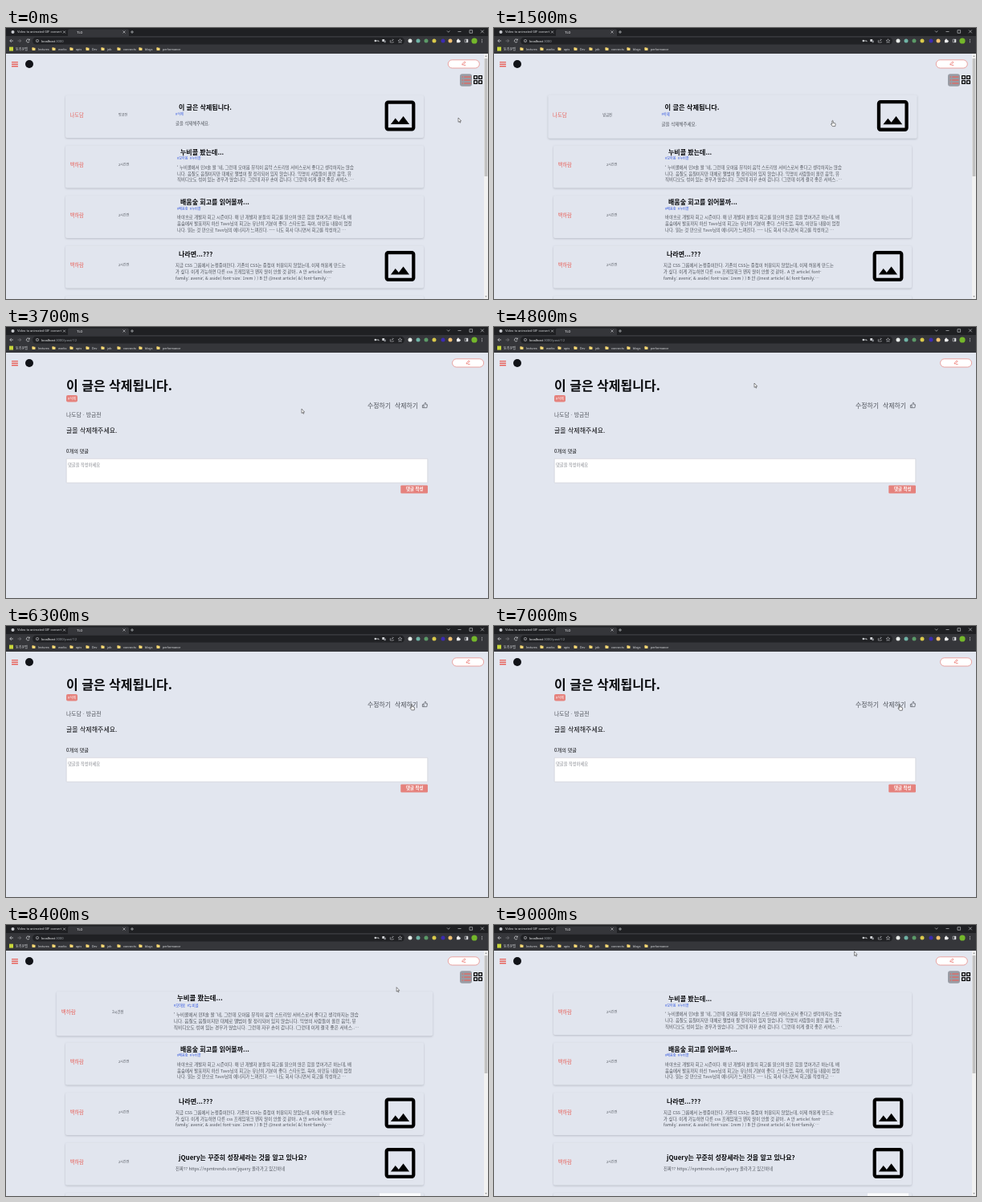
These frames come from a looping animation (600 by 338 pixels, 9100 ms). An HTML page:

```html
<!DOCTYPE html>
<html lang="ko">
<head>
<meta charset="utf-8">
<title>Blog list</title>
<style>
html, body { margin: 0; width: 100%; height: 100%; overflow: hidden; background: #e2e6ef; }
svg { display: block; width: 600px; height: 338px; }
text { font-family: "Noto Sans CJK KR", "Noto Sans CJK", "Noto Sans", sans-serif; white-space: pre; }
.ui text { font-family: Roboto, "Noto Sans CJK KR", "Noto Sans CJK", sans-serif; }
.card > rect:first-child { filter: drop-shadow(0 1px 1px rgba(40, 45, 60, .22)); }
</style>
</head>
<body>
<svg id="stage" viewBox="0 0 600 338" xmlns="http://www.w3.org/2000/svg"></svg>
<script>
const LOOP = 9100, STEP = 100;
const RED = '#e8635c', PINK = '#e5827d', INK = '#08090c', GREY = '#4f535b', BLUE = '#2f55e0';

// y is the vertical middle of the line
const text = (x, y, size, str, fill = INK, weight = 400, extra = '') =>
  `<text x="${x}" y="${(y + size * .36).toFixed(2)}" font-size="${size}" fill="${fill}" font-weight="${weight}" ${extra}>${str.replace(/&/g, '&amp;')}</text>`;
const rect = (x, y, w, h, fill, r = 0, extra = '') =>
  `<rect x="${x}" y="${y}" width="${w}" height="${h}" rx="${r}" fill="${fill}" ${extra}/>`;
const dot = (x, y, r, fill) => `<circle cx="${x}" cy="${y}" r="${r}" fill="${fill}"/>`;
const line = (d, stroke, w = .7, extra = '') =>
  `<path d="${d}" fill="none" stroke="${stroke}" stroke-width="${w}" ${extra}/>`;

// Browser frame
const folders = [[34, 'lectures'], [59, 'works'], [81, 'apis'], [101, 'Dev'], [120, 'job'],
  [140, 'connects'], [167, 'blogs'], [189, 'performance']];
const extensions = [[503, '#e8ece9'], [513, '#6fb3a5'], [523, '#5b9a68'], [533, '#d9c94a'],
  [544, '#3b2bb0'], [553, '#f3c272']];

function browser() {
  const pale = '#d5d7da';
  return `<g class="ui">` +
    rect(0, 0, 600, 11, '#1f2023') + rect(77, 1.5, 76, 10, '#35363a', 2) +
    rect(0, 10, 600, 22, '#35363a') +
    dot(8.5, 5, 2, '#c9cbd0') +
    text(14, 5, 4.1, 'Video to animated GIF convert', pale) +
    line('M71 3.5l3 3m0-3l-3 3M145.5 3.5l3 3m0-3l-3 3M155 5h4m-2-2v4', pale, .6) +
    text(88, 5, 4.2, 'TLO', '#eceef0') +
    line('M549 3.5l1.7 1.8 1.7-1.8M562.5 4.5h4M577 2.7h3.6v3.6h-3.6zM591 2.5l3.8 3.8m0-3.8l-3.8 3.8', pale, .6) +
    line('M9 16H4.8m2-2l-2 2 2 2', pale) + line('M14.5 16h4.2m-2-2l2 2-2 2', '#7b7d82') +
    line('M29 14.8a2 2 0 1 0 .2 2M29.3 13.6v1.6h-1.6', pale) +
    rect(33, 11.7, 463, 8.8, '#202124', 4.4) +
    `<circle cx="39" cy="16" r="1.7" fill="none" stroke="${pale}" stroke-width=".5"/>` +
    line('M39 15.7v1.3M39 14.8v.4', pale, .5) +
    text(44, 16, 4.2, 'localhost<tspan fill="#9aa0a6">:3000<tspan id="path"></tspan></tspan>', '#f1f3f4') +
    dot(459.8, 16, 1.2, pale) + line('M461 16h3v1.2', pale, .8) +
    rect(468.3, 14, 2.8, 3, pale, .4) + rect(470.4, 15.4, 2.4, 2.8, '#85888d', .4) +
    line('M479 15.5h-.7v2.5h4v-1M480 16.5q.3-1.8 2.2-1.8m-1-1l1 1-1 1', pale, .5) +
    line('M490.5 13.7l.7 1.6 1.7.2-1.3 1.2.4 1.7-1.5-.9-1.5.9.4-1.7-1.3-1.2 1.7-.2z', pale, .5) +
    extensions.map(([x, c]) => dot(x, 16, 2.5, c)).join('') +
    rect(561, 14.7, 3.8, 3.6, '#f0f1f2', .4) + dot(562.9, 14.5, .9, '#f0f1f2') + dot(565, 16.5, .9, '#f0f1f2') +
    line('M571.2 14.2h3.8v3.6h-3.8z', pale, .6) + rect(573, 14, 2, 4, pale) +
    dot(583, 16, 3.6, '#74b72b') + [14.2, 16, 17.8].map(y => dot(592.5, y, .5, pale)).join('') +
    rect(4, 23.6, 5, 5, '#c8d63a') + text(12, 26.2, 4.1, '토리온맵', pale) +
    folders.map(([x, name]) => rect(x - 1.5, 24.2, 2, 1.5, '#f2cc62', .3) +
      rect(x - 1.5, 24.7, 4, 3.2, '#f7d774', .3) + text(x + 6, 26.2, 3.9, name, pale)).join('') +
    `</g>`;
}

function header() {
  return [42.6, 45.2, 47.8].map(y => rect(7, y - .7, 8, 1.4, RED, .3)).join('') +
    dot(29, 45, 5, '#111318') +
    `<g id="write">` + rect(550.3, 39.8, 39, 10.2, '#fff', 5.1, `stroke="${PINK}" stroke-width=".7"`) +
    line('M567.8 46l.4-1.5 2.6-2.7 1.1 1.1-2.7 2.7zM569.5 46.4h2.8', RED, .7) + `</g>`;
}

// Post list
const ME = '백하람', AGO = '2시간전';
const posts = {
  gone: { author: '나도담', time: '방금전', title: ['이 글은 삭제됩니다.', -11], tags: ['#삭제', -3],
    body: ['글을 삭제해주세요.'], top: 9, icon: true },
  music: { title: ['누비콜 봤는데...', -18.2], tags: ['#모아봄  #누비콜', -10], top: 1, body: [
    "' 누비콜에서 민X솔 왈 '네, 그런데 모아봄 뮤직이 음악 스트리밍 서비스로서 좋다고 생각하지는 않습",
    '니다. 음질도 음질이지만 대체로 앨범이 잘 정리되어 있지 않습니다. 익명의 사람들이 올린 음악, 뮤',
    '직비디오도 섞여 있는 경우가 많습니다. 그런데 자꾸 손이 갑니다. (그런데 이게 결국 좋은 서비스..…'] },
  review: { title: ['배움숲 회고를 읽어볼까...', -18.2], tags: ['#배움숲  #누비콜', -10], top: 1, body: [
    '바야흐로 개발자 회고 시즌이다. 매 년 개발자 분들의 회고를 읽으며 많은 힘을 얻어가곤 하는데, 배',
    '움숲에서 발표까지 하신 Tavo님의 회고는 유난히 기분이 좋다. 스타트업, 육아, 이민등 내용이 엄청',
    '나다. 읽는 것 만으로 Tavo님의 에너지가 느껴진다. ---- 나도 회사 다니면서 회고를 작성하고 …'] },
  css: { title: ['나라면...???', -15.8], top: -1.5, icon: true, body: [
    '지금 CSS 그룹에서 논쟁중이란다. 기존의 CSS는 중첩이 허용되지 않았는데, 이제 허용케 만드는',
    '가 싶다. 이게 가능하면 다른 css 프레임워크 왠지 많이 안쓸 것 같아.. A 안 article{ font-',
    'family: avenir; & aside{ font-size: 1rem } } B 안 @nest article{ &{ font-family:…'] },
  jquery: { title: ['jQuery는 꾸준히 성장세라는 것을 알고 있나요?', -8], top: 6, icon: true,
    body: ['진짜?? https://npmtrends.com/jquery 올라가고 있긴하네'] },
  photo: { title: ['', 0], top: 0, body: [], photo: true }
};

const picture = y => `<path transform="translate(490.5 ${y}) scale(2.1) translate(-12 -12)" fill="#000" d="M19 3H5a2 2 0 0 0-2 2v14a2 2 0 0 0 2 2h14a2 2 0 0 0 2-2V5a2 2 0 0 0-2-2zm0 16H5V5h14zm-5.04-6.71l-2.75 3.54-1.96-2.36L6.5 17h11z"/>`;

function card(key, i) {
  const p = posts[key], y = 110.5 + 62.5 * i, x = p.icon ? 211 : 213;
  return `<g class="card">` + rect(74, y - 26.5, 446, 53, '#e1e5ee', 2) +
    (p.photo ? rect(465, y - 26, 51, 50, '#fbfcfd') : '') +
    text(79.5, y - 2, 6.3, p.author || ME, RED, 500) +
    text(140, y - 2, 4.1, p.time || AGO, GREY, 500) +
    text(x + 4, y + p.title[1], 8, p.title[0], INK, 700) +
    (p.tags ? text(x, y + p.tags[1], 4.1, p.tags[0], BLUE, 500) : '') +
    p.body.map((s, n) => text(x, y + p.top + 7.6 * n, 5.38, s, GREY, 400)).join('') +
    (p.icon ? picture(y - 1) : '') + `</g>`;
}

const list = (id, keys) => `<g id="${id}">${keys.map(card).join('')}</g>`;

function listTools() {
  const cells = [[582.6, 59.6], [588.6, 59.6], [582.6, 65.6], [588.6, 65.6]];
  return `<g id="tools">` + rect(565, 57.3, 15, 15.4, '#999ca4', 3) +
    [61, 65, 69].map(y => dot(568.2, y, .8, RED) + rect(570.2, y - .6, 8.4, 1.2, RED)).join('') +
    cells.map(([x, y]) => rect(x, y, 3.8, 3.8, 'none', .2, 'stroke="#000" stroke-width="1.3"')).join('') +
    rect(595, 32, 5, 306, '#f1f1f1') + rect(595.6, 38, 3.8, 147, '#c1c1c1') +
    `<path d="M596.3 35.8l1.2-1.5 1.2 1.5zM596.3 334.2l1.2 1.5 1.2-1.5z" fill="#777"/></g>`;
}

function detail() {
  return `<g id="detail">` +
    text(75, 73, 16, '이 글은 삭제됩니다.', INK, 700) +
    rect(75, 85, 14, 8.4, PINK, 2) + text(77, 89.2, 4.1, '#삭제', '#fff', 500) +
    text(450, 98, 7.9, '수정하기', GREY) + text(484, 98, 7.9, '삭제하기', GREY) +
    line('M518.4 97.4h1.7v3.3h-1.7zM520.1 97.4l1.7-3.2q1.1.1.9 1.3l-.3 1.3h2.1l-.6 3.9h-3.8', GREY, .7) +
    text(75, 110, 6.85, '나도담 · 방금전', GREY) +
    text(75, 129.3, 8, '글을 삭제해주세요.', INK, 500) +
    text(75, 154.3, 6.2, '0개의 댓글', INK, 500) +
    rect(75.2, 164.3, 449.6, 30, '#fff', .5, 'stroke="#c9ccd3" stroke-width=".6"') +
    text(77, 172.3, 5.25, '댓글을 작성하세요', '#85888f') +
    rect(491.3, 197.5, 33.7, 10, PINK, 1) + text(498, 202.3, 5.4, '댓글 작성', '#fff', 700) + `</g>`;
}

const cursor = `<g id="cursor">
<path id="arrow" d="M0 0v5.4l1.25-1.1.85 1.9.8-.35-.85-1.85h1.65z" fill="#fff" stroke="#222" stroke-width=".5"/>
<path id="hand" d="M-.6.5q.6-.9 1.2 0V3l2.4.6q.7.2.6 1L3.2 7.3H-.1L-2 4.9q0-.9.8-.6l.6.5z" fill="#fff" stroke="#222" stroke-width=".55"/></g>`;

const $ = id => document.getElementById(id);
$('stage').innerHTML = rect(0, 0, 600, 338, '#e2e6ef') +
  list('before', ['gone', 'music', 'review', 'css', 'jquery']) +
  list('after', ['music', 'review', 'css', 'jquery', 'photo']) +
  detail() + listTools() + header() + browser() + cursor;

// Motion tables: time, then values
const OPEN = 2200, REMOVED = 7100;
const moves = [[0, 563, 112], [900, 561, 112], [1400, 490, 116], [1500, 421.5, 115.3], [1900, 394, 116],
  [2600, 393.5, 115.5], [3600, 372, 105], [4800, 324, 70], [5100, 340, 82], [5700, 440, 134],
  [6200, 505, 97.5], [7100, 505, 98], [7300, 505, 100], [8100, 505, 100], [9000, 448.5, 33]];
const zooms = [[0, 1], [1400, 1], [1500, 1.03], [1600, 1.05], [REMOVED, 1], [7300, 1.05], [8400, 1.05], [8700, 1]];

function sample(table, t) {
  const i = table.findLastIndex(row => row[0] <= t);
  const a = table[i], b = table[i + 1] || a;
  const k = b === a ? 0 : (t - a[0]) / (b[0] - a[0]);
  return a.slice(1).map((v, n) => v + (b[n + 1] - v) * k);
}

const show = (id, on) => $(id).setAttribute('display', on ? 'inline' : 'none');
const inside = (x, y, l, t, r, b) => x >= l && x <= r && y >= t && y <= b;

function draw(t) {
  const reading = t >= OPEN && t < REMOVED;
  const [x, y] = sample(moves, t);
  const [zoom] = reading ? [1] : sample(zooms, t);
  const hand = reading ? inside(x, y, 484, 93, 513, 103) : inside(x, y, 74, 84, 520, 137);

  show('before', t < OPEN);
  show('after', t >= REMOVED);
  show('detail', reading);
  show('tools', !reading);
  show('hand', hand);
  show('arrow', !hand);
  $('path').textContent = reading ? '/post/12' : '';
  $('write').setAttribute('transform', `translate(${reading ? 5.3 : 0} 0)`);
  for (const id of ['before', 'after'])
    $(id).firstChild.setAttribute('transform', `translate(297 110.5) scale(${zoom}) translate(-297 -110.5)`);
  $('cursor').setAttribute('transform', `translate(${x} ${y})`);
}

const start = performance.now();
function tick() {
  const t = (performance.now() - start) % LOOP;
  draw(Math.floor(t / STEP) * STEP);
  requestAnimationFrame(tick);
}
tick();
</script>
</body>
</html>
```
